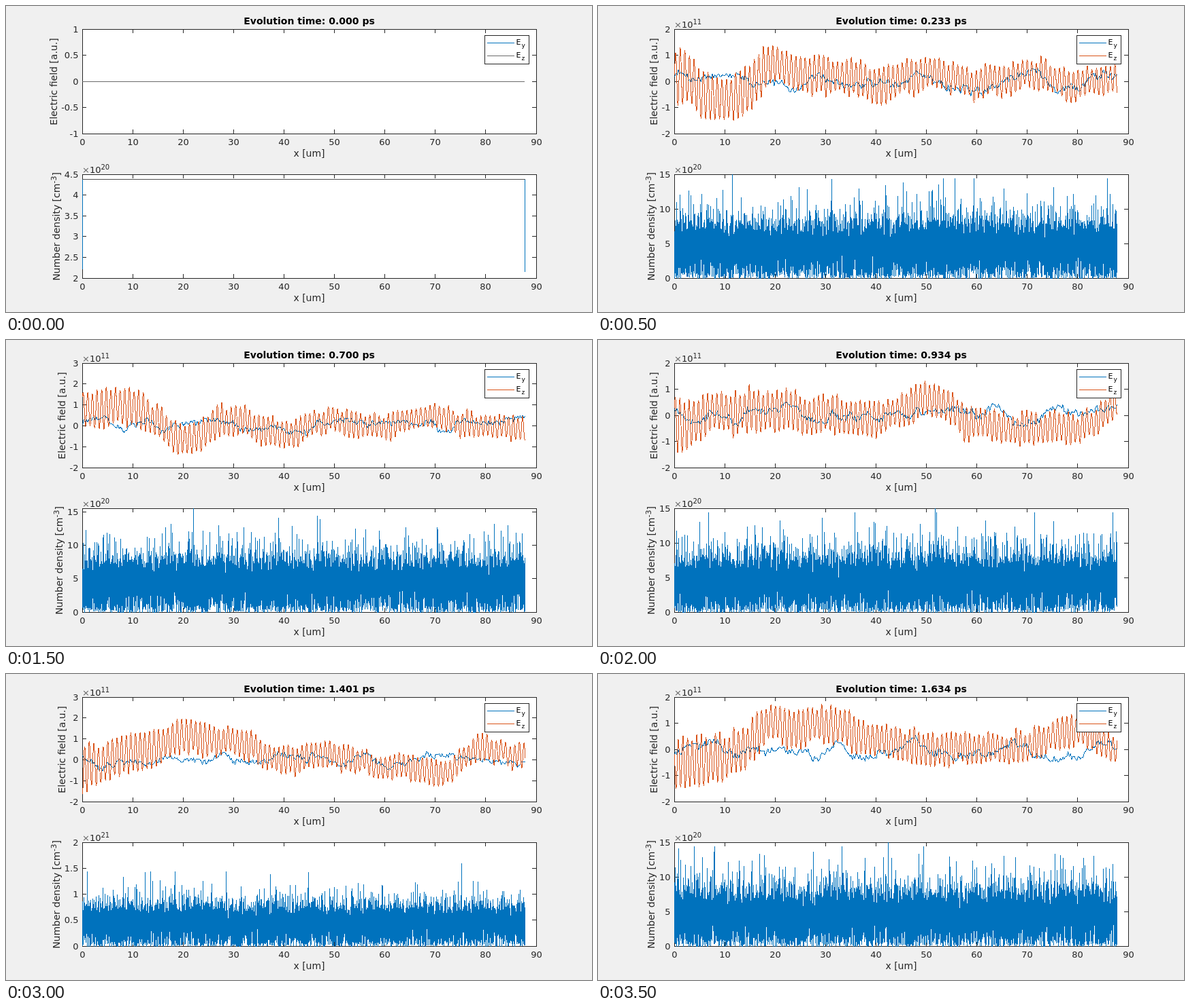
Recreate the animation shown at these times as an HTML page. Size 861 px wide and 451 px high, loop 4 s.

```html
<!DOCTYPE html>
<html lang="en">
<head>
<meta charset="utf-8">
<title>Field evolution</title>
<style>
  html, body { margin: 0; width: 100%; height: 100%; overflow: hidden; background: #f0f0f0; }
  svg { display: block; font: 13px "DejaVu Sans", sans-serif; fill: #262626; }
  path, rect { shape-rendering: crispEdges; fill: none; stroke-width: 1; }
  .axis { stroke: #262626; fill: #fff; }
  .label { font-size: 14px; text-anchor: middle; }
  .title { font-size: 14px; font-weight: bold; fill: #000; text-anchor: middle; }
  .power { font-size: 10px; }
  .unit { font-size: 11px; }
  .legend { font-size: 11px; fill: #000; }
  .sub { font-size: 9px; }
</style>
</head>
<body>
<svg id="stage" width="861" height="451" viewBox="0 0 861 451"></svg>
<script>
const BLUE = '#0072bd', ORANGE = '#d95319', GRAY = '#6b6b6b', DARK = '#262626';
const LEFT = 112, RIGHT = 779, END = 87.8, WAVELENGTH = 0.917;
const STEP_MS = 500, STEP_PS = 0.23345;
const px = um => LEFT + um * (RIGHT - LEFT) / 90;

// field, density: [low, high, tick step]. mid: centre of Ez every 10 um.
// crest, spike: position of one Ez peak and of the tallest density peak, in um.
const frames = [
  { field: [-1, 1, 0.5], density: [2, 4.5, 0.5], still: true },
  { field: [-2, 2, 1], density: [0, 15, 5], crest: 21.3, spike: 11.5,
    mid: [.2, -.85, .55, .3, -.05, .25, -.1, .3, -.1, .1] },
  { field: [-2, 3, 1], density: [0, 15, 5], crest: 16.2, spike: 28.4 },
  { field: [-2, 3, 1], density: [0, 15.6, 5], crest: 4.7, spike: 22,
    mid: [.9, .9, -.55, .3, -.4, .35, 0, .4, -.1, 0] },
  { field: [-2, 2, 1], density: [0, 15, 5], crest: 30.4, spike: 51.7 },
  { field: [-2, 1.18, 1], density: [0, 15.8, 5], crest: 4.45, spike: 67.6,
    mid: [0, -.3, -.8, 0, 0, -.4, -.1, -.1, 0, 0] },
  { field: [-2, 3, 1], density: [0, 2, 0.5], crest: 16, spike: 75.1, power: 21,
    mid: [-.4, .4, 1.1, .9, 0, .2, -.3, -.6, .5, 0] },
  { field: [-2, 2, 1], density: [0, 15, 5], crest: 17.25, spike: 42.4,
    mid: [-.5, -.2, .9, .9, .35, .1, 0, .1, .7, 0] }
];

function randomFrom(seed) {
  return () => {
    seed = (seed + 0x6D2B79F5) | 0;
    let t = Math.imul(seed ^ (seed >>> 15), 1 | seed);
    t = (t + Math.imul(t ^ (t >>> 7), 61 | t)) ^ t;
    return ((t ^ (t >>> 14)) >>> 0) / 4294967296;
  };
}

// Smooth curve through values spaced evenly by `gap` micrometres.
function curve(values, gap) {
  return x => {
    const p = Math.min(x / gap, values.length - 1.001), i = Math.floor(p);
    const s = (1 - Math.cos((p - i) * Math.PI)) / 2;
    return values[i] + (values[i + 1] - values[i]) * s;
  };
}

const noise = (rand, gap, size) =>
  curve(Array.from({ length: Math.ceil(90 / gap) + 2 }, () => (rand() - 0.5) * 2 * size), gap);

const text = (x, y, body, attrs = '') => `<text x="${x}" y="${y}" ${attrs}>${body}</text>`;
const path = (d, color) => `<path d="${d}" stroke="${color}"/>`;
const box = (x, y, w, h) => `<rect x="${x}.5" y="${y}.5" width="${w}" height="${h}" class="axis"/>`;
const labelWidth = s => 13 * [...s].reduce((w, c) => w + (c === '.' ? .318 : c === '-' ? .361 : .636), 0);

function axes(top, bottom, [low, high, step], name, power) {
  const y = v => bottom + 0.5 - (v - low) / (high - low) * (bottom - top);
  let marks = '', labels = '', widest = 0;
  for (let um = 0; um <= 90; um += 10) {
    const x = Math.floor(px(um)) + 0.5;
    marks += `M${x} ${bottom}v-6M${x} ${top}v6`;
    labels += text(x, bottom + 17, um, 'text-anchor="middle"');
  }
  for (let v = low; v <= high + 1e-6; v += step) {
    const tickY = Math.floor(y(v) - 0.5 + 1e-6) + 0.5, label = String(v);
    marks += `M${LEFT} ${tickY}h6M${RIGHT} ${tickY}h-6`;
    labels += text(106.5, tickY + 4.5, label, 'text-anchor="end"');
    widest = Math.max(widest, labelWidth(label));
  }
  const nameX = Math.round(100 - widest), nameY = (top + bottom + 1) / 2;
  labels += text(0, 0, name, `class="label" transform="translate(${nameX} ${nameY}) rotate(-90)"`);
  labels += text(445.5, bottom + 34, 'x [um]', 'class="label"');
  if (power) labels += text(LEFT, top - 2,
    `<tspan fill="#666">×</tspan>10<tspan class="power" dy="-5">${power}</tspan>`);
  return { y, svg: box(LEFT, top, RIGHT - LEFT, bottom - top) + path(marks, DARK) + labels };
}

function trace(fn, y) {
  let d = '';
  for (let um = 0; um <= END; um += 0.08)
    d += (d ? 'L' : 'M') + (px(um) + .5).toFixed(1) + ' ' + y(fn(um)).toFixed(1);
  return d;
}

function fieldLines(f, y, rand) {
  if (f.still) return path(`M${LEFT} 111.5H762`, GRAY);
  const mid = f.mid ? curve(f.mid, 10) : noise(rand, 10, 0.6);
  const sway = noise(rand, 1.7, 0.18), swing = noise(rand, WAVELENGTH, 0.25);
  const slow = noise(rand, 4, 0.35), bend = noise(rand, 1.2, 0.15), jitter = noise(rand, 0.25, 0.12);
  const amp = x => (0.5 + 0.45 * Math.exp(-x / 35)) * (1 + swing(x));
  const ez = x => mid(x) + sway(x) + amp(x) * Math.cos((x - f.crest) * 2 * Math.PI / WAVELENGTH);
  const ey = x => slow(x) + bend(x) + jitter(x);
  return path(trace(ey, y), BLUE) + path(trace(ez, y), ORANGE);
}

function densityLines(f, y, rand) {
  if (f.still) return path(`M112.5 ${y(2.22)}V255M762.5 ${y(2.15)}V255`, BLUE) + path('M112 255.5H763', '#505050');
  const unit = f.power === 21 ? 10 : 1, spikeX = Math.round(px(f.spike));
  let d = '';
  for (let x = LEFT; x <= 762; x++) {
    // Extremes of many samples per column: Gumbel above, exponential below.
    const peak = 8 - 1.2 * Math.log(-Math.log(rand() + 1e-9));
    const high = x === spikeX ? 16 : Math.min(peak, 14.5);
    const low = Math.max(0, -0.75 * Math.log(rand() + 1e-2) - 0.1);
    d += `M${x + .5} ${y(low / unit).toFixed(1)}V${y(high / unit).toFixed(1)}`;
  }
  return path(d, BLUE);
}

function legend(ezColor) {
  const row = (y, sub, color) => path(`M707 ${y}.5h40`, color) +
    text(749.5, y + 3, `E<tspan class="sub" dx="1" dy="4">${sub}</tspan>`, 'class="legend"');
  return box(703, 43, 65, 42) + row(54, 'y', BLUE) + row(73, 'z', ezColor);
}

function render(f, i) {
  const rand = randomFrom(100 + i * 17);
  const field = axes(34, 188, f.field, 'Electric field [a.u.]', f.still ? 0 : 11);
  const density = axes(248, 401, f.density,
    'Number density [cm<tspan class="unit" dy="-5">-3</tspan><tspan dy="5">]</tspan>', f.power || 20);
  return '<clipPath id="a"><path d="M112 34h668v155h-668z"/></clipPath>' +
    '<clipPath id="b"><path d="M112 248h668v154h-668z"/></clipPath>' +
    text(445.5, 27, `Evolution time: ${(i * STEP_PS).toFixed(3)} ps`, 'class="title"') +
    field.svg + `<g clip-path="url(#a)">${fieldLines(f, field.y, rand)}</g>` +
    density.svg + `<g clip-path="url(#b)">${densityLines(f, density.y, rand)}</g>` +
    legend(f.still ? GRAY : ORANGE);
}

const stage = document.getElementById('stage');
const pictures = frames.map(render);
let shown = -1;

function tick() {
  const i = Math.floor(performance.now() / STEP_MS) % pictures.length;
  if (i !== shown) stage.innerHTML = pictures[shown = i];
  requestAnimationFrame(tick);
}
tick();
</script>
</body>
</html>
```
